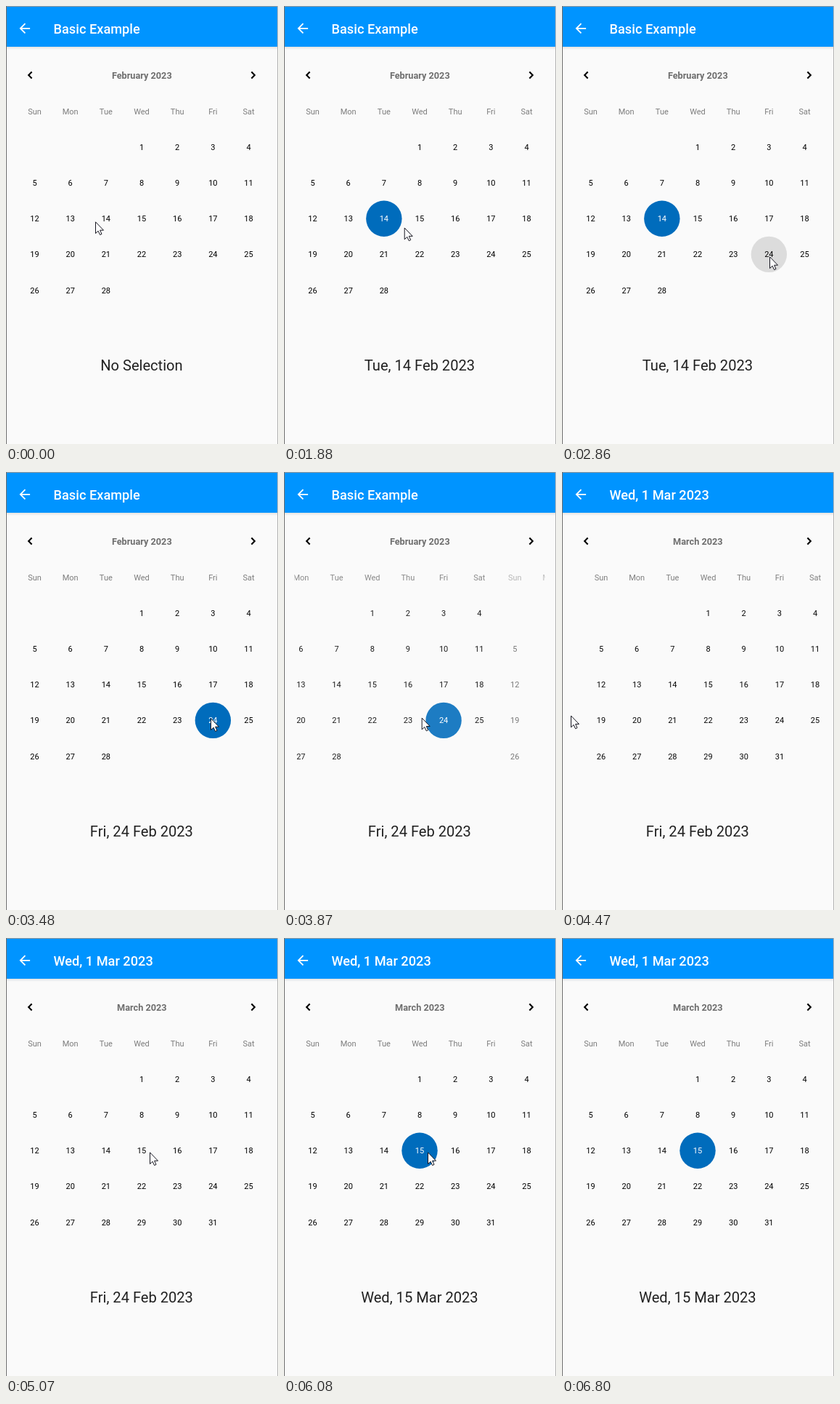
An HTML page for the animation above (7.33 s loop, 375 px wide and 602 px high).

```html
<!DOCTYPE html>
<html lang="en">
<head>
<meta charset="utf-8">
<title>Calendar</title>
<style>
html, body { margin: 0; width: 100%; height: 100%; overflow: hidden; background: #fafafa; }
svg { display: block; font-family: Roboto, sans-serif; }
.page { font-size: 11px; text-anchor: middle; }
.mid { text-anchor: middle; }
</style>
</head>
<body>
<svg width="375" height="602" viewBox="0 0 375 602">
  <defs>
    <clipPath id="view"><rect x="14.5" y="120" width="345" height="300"/></clipPath>
    <linearGradient id="shade" x2="0" y2="1">
      <stop stop-opacity=".1"/><stop offset="1" stop-opacity="0"/>
    </linearGradient>
  </defs>
  <rect width="375" height="602" fill="#fafafa"/>
  <rect y="56" width="375" height="4" fill="url(#shade)"/>
  <rect width="375" height="56" fill="#0094ff"/>
  <path d="M20 11H7.83l5.59-5.59L12 4l-8 8 8 8 1.41-1.41L7.83 13H20z" fill="#fff" transform="translate(14.9 19.9) scale(.91)"/>
  <text id="title" x="65.5" y="37.6" font-size="18.2" font-weight="500" fill="#fff"></text>
  <path d="M35.6 90.6L31.2 95l4.4 4.4M338.4 90.6l4.4 4.4-4.4 4.4" fill="none" stroke="#000" stroke-width="2.1"/>
  <text id="month" class="mid" x="187.3" y="100.3" font-size="12.7" font-weight="700" fill="#6e6e6e"></text>
  <g clip-path="url(#view)"><g id="feb" class="page"></g><g id="mar" class="page"></g></g>
  <text id="label" class="mid" x="186.9" y="500.5" font-size="20.1" fill="#212121"></text>
  <path d="M0 .5H375" stroke="#999"/>
  <path d="M.5 0V602" stroke="#6e6e6e"/>
  <path d="M374.5 0V602" stroke="#b4b4b4"/>
  <path id="cursor" d="M.5 .8V16.6L4.1 13.2 6.6 18.5 9 17.4 6.6 12.2H11.5z" fill="#fff" stroke="#15151f"/>
</svg>
<script>
const LOOP = 7330, STEP = 120, CELL = 49.17, PAGE = 344;
const DRAG = 3480, RELEASE = 4230, GRAB_X = 282, DRAG_RATIO = .707;
const $ = id => document.getElementById(id);

// Pointer moves: start time, steps, end point, ease-in power
const moves = [
  { start: 990, steps: 2, to: [141, 296] },
  { start: 1880, steps: 5, to: [286, 344], power: 1.1 },
  { start: DRAG, steps: 1, to: [GRAB_X, 338] },
  { start: 3600, steps: 2, to: [268, 338] },
  { start: 3870, steps: 3, to: [33, 336] },
  { start: RELEASE, steps: 2, to: [4, 336] },
  { start: 4470, steps: 6, to: [198, 294], power: 1.78 },
  { start: 6200, steps: 5, to: [371, 597], power: 1.3 },
  { start: 6800, steps: 1, to: [400, 640] },
];
const picks = [
  { time: 0, day: 0, label: 'No Selection' },
  { time: 1480, day: 14, label: 'Tue, 14 Feb 2023' },
  { time: 3110, day: 24, label: 'Fri, 24 Feb 2023' },
  { time: 5960, day: 15, label: 'Wed, 15 Mar 2023' },
];

// Motion advances in whole steps, the first one at its start time
function progress(t, start, steps) {
  const n = Math.floor((t - start) / STEP) + 1;
  return Math.min(1, Math.max(0, n / steps));
}

function pointerAt(t) {
  return moves.reduce((from, { start, steps, to, power = 1 }) => {
    const u = progress(t, start, steps) ** power;
    return from.map((v, i) => v + (to[i] - v) * u);
  }, [123, 296]);
}

// The page follows the dragging pointer, then eases out to the next month
function pageShift(t) {
  if (t < DRAG) return 0;
  const dragged = DRAG_RATIO * (GRAB_X - pointerAt(Math.min(t, RELEASE - 1))[0]);
  return PAGE - (PAGE - dragged) * (1 - progress(t, RELEASE, 5)) ** 2.67;
}

const colX = col => 39.5 + col * CELL;
const text = (x, y, s, fill) => `<text x="${x}" y="${y}" fill="${fill}">${s}</text>`;

// Both months start on a Wednesday
function drawPage(id, days, x, picked, pressed, ripple) {
  let out = ['Sun', 'Mon', 'Tue', 'Wed', 'Thu', 'Fri', 'Sat']
    .map((d, i) => text(colX(i), 149, d, '#7c7c7c')).join('');
  for (let d = 1; d <= days; d++) {
    const slot = d + 2, cx = colX(slot % 7), cy = 193.9 + Math.floor(slot / 7) * CELL;
    const disc = (r, fill) => `<circle cx="${cx}" cy="${cy}" r="${r}" fill="${fill}"/>`;
    if (d === picked) out += disc(24.7, '#006cbc');
    if (d === pressed) out += disc(24.7 * ripple, 'rgba(0,0,0,.12)');
    out += text(cx, Math.round(cy + 4), d, d === picked ? '#fff' : '#000');
  }
  const g = $(id);
  g.innerHTML = out;
  g.setAttribute('transform', `translate(${x})`);
  g.setAttribute('opacity', Math.max(0, 1 - .6 * Math.abs(x) / PAGE));
}

function draw(t) {
  const [px, py] = pointerAt(t), shift = pageShift(t);
  const { time, day, label } = picks.findLast(p => p.time <= t);
  const inMarch = t >= 4350, marchPick = label.includes('Mar');
  const holding = t >= 2740 && t < 3110;
  const pressed = holding ? 24 : t < time + STEP ? day : 0;
  const ripple = holding ? progress(t, 2740, 2) : 1;
  $('title').textContent = inMarch ? 'Wed, 1 Mar 2023' : 'Basic Example';
  $('month').textContent = inMarch ? 'March 2023' : 'February 2023';
  $('label').textContent = label;
  drawPage('feb', 28, -shift, marchPick ? 0 : day, pressed, ripple);
  drawPage('mar', 31, PAGE - shift, marchPick ? day : 0, marchPick ? pressed : 0, ripple);
  $('cursor').setAttribute('transform', `translate(${px} ${py})`);
}

let start;
function frame(now) {
  start ??= now;
  draw((now - start) % LOOP);
  requestAnimationFrame(frame);
}
requestAnimationFrame(frame);
</script>
</body>
</html>
```
